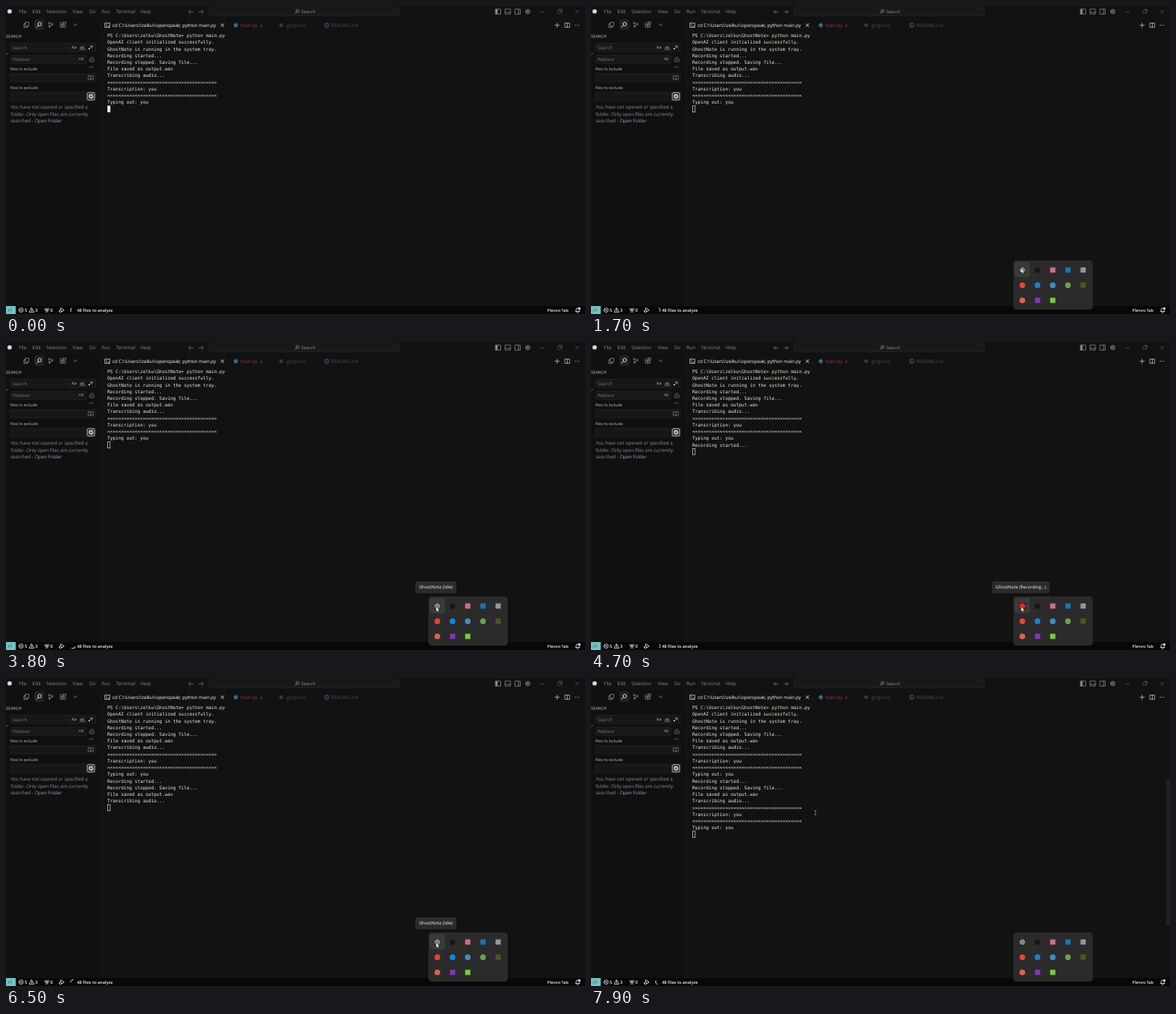
Animation, 800 px wide and 426 px high, one loop 8 s. Source, as an HTML page:

```html
<!DOCTYPE html>
<html lang="en">
<head>
<meta charset="utf-8">
<title>Voice note terminal</title>
<style>
  html, body { margin: 0; width: 100%; height: 100%; overflow: hidden; background: #121212; }
  svg { display: block; width: 800px; height: 426px; }
  text { font-family: "Open Sans", "Noto Sans", sans-serif; text-rendering: geometricPrecision; white-space: pre; }
  .mono { font-family: "DejaVu Sans Mono", "Noto Sans Mono", monospace; }
</style>
</head>
<body>
<svg id="stage" viewBox="0 0 800 426" xmlns="http://www.w3.org/2000/svg"></svg>
<script>
const NS = "http://www.w3.org/2000/svg";
const stage = document.getElementById("stage");
const LOOP = 8000, STEP = 100;

function add(tag, attrs, parent = stage) {
  const el = document.createElementNS(NS, tag);
  for (const key in attrs) el.setAttribute(key, attrs[key]);
  return parent.appendChild(el);
}
const group = (parent) => add("g", {}, parent);
const rect = (x, y, width, height, fill, more = {}, parent) =>
  add("rect", { x, y, width, height, fill, ...more }, parent);
const dot = (cx, cy, r, fill, parent) => add("circle", { cx, cy, r, fill }, parent);
const line = (d, stroke, width = 0.8, parent) =>
  add("path", { d, stroke, fill: "none", "stroke-width": width, "stroke-linecap": "round", "stroke-linejoin": "round" }, parent);
const ring = (x, y, r) => `M${x - r} ${y}a${r} ${r} 0 1 1 ${2 * r} 0a${r} ${r} 0 1 1 ${-2 * r} 0`;
const box = (x, y, w, h) => `M${x} ${y}h${w}v${h}h${-w}z`;
const cross = (x, y, r) => `M${x - r} ${y - r}l${2 * r} ${2 * r}m0 ${-2 * r}l${-2 * r} ${2 * r}`;
const lens = (x, y, r) => `${ring(x + r * .4, y - r * .4, r)}M${x - r * .4} ${y + r * .4}l${-r} ${r}`;

// y is the vertical middle of the lower-case letters' line
function label(str, x, y, fill, size = 6.5, more = {}, parent) {
  const el = add("text", { x, y: y + size * .34, fill, "font-size": size, ...more }, parent);
  el.textContent = str;
  return el;
}
function dots(x, y, fill) {
  for (const dx of [-2.4, 0, 2.4]) dot(x + dx, y, .6, fill);
}
const show = (el, on) => el.setAttribute("visibility", on ? "visible" : "hidden");
const strong = { "font-weight": 600 };

function drawTitleBar() {
  dot(5, 7.5, 3, "#d8d8d8");
  const menus = { File: 18, Edit: 36.5, Selection: 56, View: 92, Go: 115, Run: 132, Terminal: 152, Help: 186 };
  for (const name in menus) label(name, menus[name], 8, "#8c8c8c", 6.55);
  line("M258.5 8h-6m2.5-2.5l-2.5 2.5l2.5 2.5M266.5 8h6m-2.5-2.5l2.5 2.5l-2.5 2.5", "#777");
  rect(280.5, 2, 263, 11.5, "#191919", { rx: 2.5, stroke: "#292929", "stroke-width": .7 });
  line(lens(402, 7.8, 2), "#999");
  label("Search", 408, 8, "#929292", 6.1);
  for (const x of [676.5, 690, 703.5]) line(box(x, 4.2, 7, 7), "#8c8c8c");
  rect(676.5, 4.2, 2.8, 7, "#8c8c8c");
  line("M690 8.8h7M708 4.2v7", "#8c8c8c");
  line(ring(721, 7.7, 3) + ring(721, 7.7, 1.1), "#8c8c8c", 1);
  line("M738.5 8h5" + box(763, 6, 4, 4) + "M764.5 4.7h4v4" + cross(789, 7.7, 2.2), "#5c5c5c", .7);
}

function drawTabs() {
  rect(39, 18.5, 13.5, 14.5, "#222", { rx: 2.5 });
  line(box(26.8, 22.5, 4.6, 5.4) + "M26.5 24.5h-1.7v5.2h4.7v-1.7", "#949494");
  line(lens(45.6, 26, 2.4), "#e0e0e0", 1);
  line(ring(60, 23.5, 1.1) + ring(60, 28.5, 1.1) + ring(64, 24.8, 1.1) + "M60 24.6v2.8M64 26q0 1.5-3 1.7", "#949494", .7);
  line(box(75.5, 23, 3.2, 3.2) + box(75.5, 26.2, 3.2, 3.2) + box(78.7, 26.2, 3.2, 3.2) + box(79.8, 22, 2.8, 2.8), "#949494", .7);
  line("M93.8 25l2.2 2.2l2.2-2.2", "#949494");

  line(box(137, 23.6, 6.4, 6) + "M138.4 25.2l1.5 1.4l-1.5 1.4m2.3 .2h1.4", "#d8d8d8", .8);
  label("cd C:\\\\Users\\\\zelku\\\\openspeak; python main.py", 147, 26.8, "#fff", 6.38, { "font-weight": 500 });
  line(cross(299, 26.6, 2), "#f0f0f0", .9);
  dot(317.5, 26.6, 2.8, "#2b6f8b");
  label("main.py", 323.7, 26.8, "#9c3a4c", 6.45);
  label("8", 351, 26.8, "#8c3443", 6.1);
  dot(380, 26.6, 2.5, "#3b3b3b");
  label(".gitignore", 386, 26.8, "#474747", 6.5);
  line(ring(443.2, 26.6, 3) + "M443.2 26.2v2m0-3.4v.1", "#3a7893", .8);
  label("README.md", 449.5, 26.8, "#4a4a4a", 6.4);
  line("M758.5 26.5h6m-3-3v6" + box(772.5, 23.5, 6.3, 6) + "M775.6 23.5v6", "#c4c4c4");
  dots(789, 26.6, "#c4c4c4");
}

function drawSidebar() {
  const field = (y, w, h) => rect(6, y, w, h, "#171717", { rx: 1.5, stroke: "#242424", "stroke-width": .7 });
  label("SEARCH", 0, 41.8, "#c4c4c4", 5.8);
  field(51.5, 118, 11.5);
  label("Search", 9, 57.3, "#777");
  label("Aa", 90.5, 57.2, "#b4b4b4", 5.8);
  label("ab", 102, 56.8, "#b4b4b4", 5.6);
  line("M102 60.2h7", "#b4b4b4", .6);
  rect(114, 58, 2, 2, "#b4b4b4");
  line("M118.2 54.4v3.6m-1.6-2.7l3.2 1.8m0-1.8l-3.2 1.8", "#b4b4b4", .6);
  field(68.5, 105, 11);
  label("Replace", 9, 74, "#777");
  label("AB", 100.5, 73.3, "#a4a4a4", 5.2);
  line(box(115.6, 73, 6, 4) + "M116.5 71.5q2-2 4 0M117 75h3", "#777", .7);
  line("M0 66.5l.8.8l2-2.7", "#888", .6);
  dots(118, 84.5, "#b4b4b4");
  label("files to include", 6, 87, "#c0c0c0", 5.5);
  field(93.5, 118, 11.5);
  line("M117 97v5q-1.5-1-3.4-.7v-5q2-.2 3.4.7q1.5-1 3.4-.7v5q-2-.3-3.4.7", "#8a8a8a", .7);
  label("files to exclude", 6, 113.2, "#c0c0c0", 5.5);
  field(119, 118, 12);
  rect(112.2, 119.7, 10.4, 10.4, "#3a3a3a", { rx: 1.5, stroke: "#c8c8c8", "stroke-width": .8 });
  line(ring(117.5, 125, 2.6) + "M115 123.2h3.5M117 126h3", "#f0f0f0", 1);
  label("You have not opened or specified a", 6.5, 140, "#8f8f8f", 6.5);
  label("folder. Only open files are currently", 6.5, 149.4, "#8f8f8f", 6.5);
  label("searched - ", 6.5, 158.8, "#8f8f8f", 6.5);
  label("Open Folder", 40, 158.8, "#8fabc4", 6.4);
}

function drawStatusBar() {
  rect(0, 415, 800, 11, "#080808");
  rect(0, 415, 13.5, 11, "#75c3c2");
  line("M3 419l2 2l-2 2M8 418l-2 2l2 2", "#285c60", .8);
  const ink = "#f4f4f4";
  line(ring(20.8, 420.6, 3) + cross(20.8, 420.6, 1.2), ink);
  label("5", 25.7, 420.8, ink, 6.1, strong);
  line("M35.5 417.6l3.2 5.8h-6.4zM35.5 419.7v1.6m0 .9v.1", ink, .8);
  label("3", 40.3, 420.8, ink, 6.1, strong);
  line("M54.3 418q-1.4 1.6 0 3.2M58.7 418q1.4 1.6 0 3.2M55.7 418.7q-.6.9 0 1.8M57.3 418.7q.6.9 0 1.8M56.5 419.7l-1.4 4m1.4-4l1.4 4", ink, .8);
  label("0", 61.2, 420.8, ink, 6.1, strong);
  line("M75.5 419v-1.5l4.8 3.2l-3 2" + ring(75.2, 422, 1.6), ink, .9);
  label("48 files to analyze", 98, 420.8, ink, 5.8, strong);
  label("Plenvo Tab", 748, 420.8, ink, 5.55, strong);
  line("M787.2 422.4h5.6q-.9-1-.9-2.6q0-2-2-2t-2 2q0 1.6-.7 2.6M789 424h1.6", ink, .9);
  dot(792.2, 418.2, 1.5, ink);
}

function drawTray() {
  const tray = group();
  rect(584, 352.3, 109, 67.2, "#2b2b2b", { rx: 4, stroke: "#353535", "stroke-width": .5 }, tray);
  const hover = rect(585.5, 354, 21, 21, "#3a3a3a", { rx: 2.5 }, tray);
  rect(591.8, 361, 8.4, 8.4, "#141414", {}, tray);
  const colors = [
    "#858585", "#171717", "#cf6f87", "#1c74b8", "#8d99a3",
    "#ee402f", "#1684d8", "#3d8fc6", "#62a84d", "#405f17",
    "#df6148", "#8438b1", "#70cf3d"];
  const squares = [2, 3, 4, 9, 11, 12];
  const icons = colors.map((color, i) => {
    const x = 596 + i % 5 * 21, y = 365.2 + Math.floor(i / 5) * 21;
    return squares.includes(i)
      ? rect(x - 3.6, y - 3.6, 7.2, 7.2, color, { rx: .6 }, tray)
      : dot(x, y, 3.9, color, tray);
  });
  return { tray, hover, mic: icons[0] };
}

const script = [
  [0, "PS C:\\Users\\zelku\\GhostNote> "],
  [0, "OpenAI client initialized successfully."],
  [0, "GhostNote is running in the system tray."],
  [0, "Recording started..."],
  [0, "Recording stopped. Saving file..."],
  [0, "File saved as output.wav"],
  [0, "Transcribing audio..."],
  [0, ">".repeat(40)],
  [0, "Transcription: you"],
  [0, "<".repeat(40)],
  [0, "Typing out: you"],
  [4100, "Recording started..."],
  [6100, "Recording stopped. Saving file..."],
  [6100, "File saved as output.wav"],
  [6200, "Transcribing audio..."],
  [6900, ">".repeat(40)],
  [6900, "Transcription: you"],
  [6900, "<".repeat(40)],
  [6900, "Typing out: you"]
];
const rowY = (i) => 41 + i * 9.225;

rect(0, 0, 800, 426, "#121212");
rect(0, 16.5, 131, 399, "#101010");
line("M131 17v398", "#1b1b1b", .6);
drawTitleBar();
drawTabs();
drawSidebar();
const rows = script.map(([at, str], i) => {
  const el = label(str, 140, rowY(i), "#ebebeb", 6.29, { class: "mono" });
  if (i === 0) {
    add("tspan", { fill: "#f1dfb0" }, el).textContent = "python ";
    add("tspan", {}, el).textContent = "main.py";
  }
  return { at, el };
});
const caret = rect(140.4, 0, 3.5, 8.6, "none", { stroke: "#e4e4e4", "stroke-width": .7 });
const scrollbar = rect(794.5, 140, 5.5, 203, "#212121");
drawStatusBar();
const spinner = line("M90.4 423.1A3.2 3.2 0 0 1 90.4 418.1", "#f4f4f4", .9);
const { tray, hover, mic } = drawTray();

const tip = group();
const tipBox = rect(0, 331.5, 0, 15.5, "#2b2b2b", { rx: 2.5, stroke: "#393939", "stroke-width": .5 }, tip);
const tipText = label("", 594, 339.3, "#fafafa", 6.15, { "text-anchor": "middle" }, tip);

const arrow = add("path", { d: "M0 0v7l1.6-1.4l1.1 2.3l1.2-.6l-1.1-2.2h2.1z", fill: "#fff", stroke: "#111", "stroke-width": .5 });
const beam = line("M-1-2.8h2M0-2.8v5.6M-1 2.8h2", "#b0b0b0", .6);

// time, x, y of the pointer
const path = [
  [1200, 638, 432], [1500, 594, 362.5], [1800, 594, 362.5], [2000, 594.2, 366],
  [7200, 594.2, 366], [7700, 310, 186.3]
];
function pointerAt(t) {
  const i = path.findIndex(([at]) => at > t);
  if (i === 0) return path[0].slice(1);
  if (i < 0) return path[path.length - 1].slice(1);
  const [t0, x0, y0] = path[i - 1], [t1, x1, y1] = path[i];
  const u = (t - t0) / (t1 - t0), k = u * u * (3 - 2 * u);
  return [x0 + (x1 - x0) * k, y0 + (y1 - y0) * k];
}

function render(t) {
  let count = 0;
  for (const { at, el } of rows) {
    show(el, t >= at);
    if (t >= at) count++;
  }
  caret.setAttribute("y", rowY(count) - 4.4);
  caret.setAttribute("fill", t < 500 ? "#f4f4f4" : "none");
  spinner.setAttribute("transform", `rotate(${(.03 + t * .002015) * 360} 92.4 420.6)`);

  const opened = Math.min(1, Math.max(0, (t - 500) / 400));
  show(tray, opened > 0);
  tray.setAttribute("transform", `translate(0 ${74 * (1 - opened) ** 3})`);

  const [x, y] = pointerAt(t);
  const overIcon = x < 607 && x > 585 && y > 352 && y < 376;
  const overText = x < 580;
  const recording = t >= 4100 && t < 6100;
  // Children set to "visible" would outlive a hidden tray, so inherit instead.
  hover.setAttribute("visibility", overIcon ? "inherit" : "hidden");
  mic.setAttribute("fill", recording ? "#ed2020" : "#858585");

  show(tip, t >= 2200 && overIcon);
  const width = recording ? 79 : 56;
  tipBox.setAttribute("x", 594 - width / 2);
  tipBox.setAttribute("width", width);
  tipText.textContent = recording ? "GhostNote (Recording...)" : "GhostNote (Idle)";

  for (const el of [arrow, beam]) el.setAttribute("transform", `translate(${x} ${y})`);
  show(arrow, t > 1200 && !overText);
  show(beam, overText);
  show(scrollbar, overText);
}

const start = performance.now();
function frame() {
  const t = (performance.now() - start) % LOOP;
  render(Math.floor(t / STEP) * STEP);
  requestAnimationFrame(frame);
}
frame();
</script>
</body>
</html>
```
